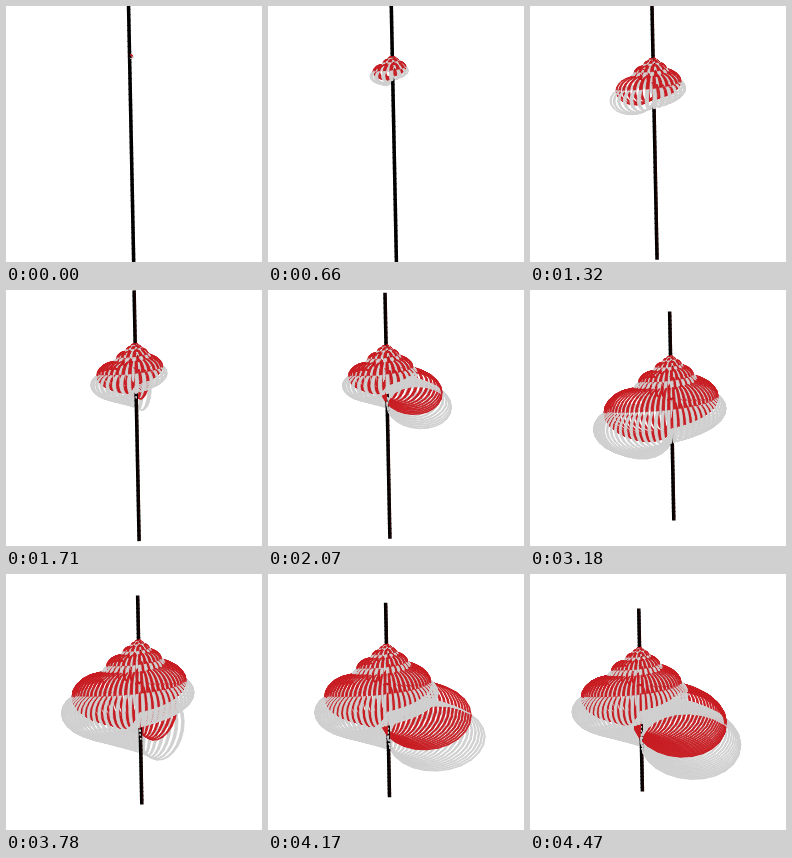
An HTML page with a canvas for the animation above (4500 ms loop, 256 by 256 pixels).

```html
<!DOCTYPE html>
<html lang="en">
<head>
<meta charset="utf-8">
<title>Growing shell</title>
<style>
  html, body { margin: 0; width: 100%; height: 100%; overflow: hidden; background: #fff; }
  canvas { display: block; width: 100vw; height: 100vh; }
</style>
</head>
<body>
<canvas id="stage" width="256" height="256"></canvas>
<script>
const ctx = document.getElementById('stage').getContext('2d');

const STEPS = 150, STEP_MS = 30;
const FIRST = 4, LAST = FIRST + STEPS - 1;
const TWIST = 8.55, END_ANGLE = 0.28;   // radians
const TILT = 0.14, LEAN = 0.02;
const RIBBON = 0.42, SEGMENTS = 24;

// Ring shape: distance from the axis, half width, drop below the tip, half height
const LAYERS = [
  { color: '#d0d0d0', dist: 0.279, wide: 0.281, drop: 0.540, high: 0.180 },
  { color: '#c81e23', dist: 0.220, wide: 0.262, drop: 0.420, high: 0.180 }
];

// Time in ms, value
const AXIS_X = [[0, 123.5], [600, 124.5], [1000, 123], [1320, 123], [1530, 131],
  [1820, 128], [2070, 118], [2400, 115], [2700, 118.5], [2760, 122], [3180, 140.5],
  [3400, 140], [3780, 132.5], [4320, 113], [4470, 109.5]];
const AXIS_LENGTH = [[0, 266], [1320, 255], [2070, 245], [2160, 244], [2700, 218],
  [3180, 208], [3780, 208], [4320, 188], [4470, 182]];

function valueAt(keys, t) {
  const i = keys.findIndex(k => k[0] >= t);
  if (i < 0) return keys[keys.length - 1][1];
  if (i === 0) return keys[0][1];
  const [t0, a] = keys[i - 1], [t1, b] = keys[i];
  return a + (b - a) * (t - t0) / (t1 - t0);
}

// Ring size grows evenly, its angle with the logarithm of the size
function pointOn(layer, n, v) {
  const s = n / LAST;
  const angle = END_ANGLE + TWIST * Math.log(s);
  const rho = s * (layer.dist + layer.wide * Math.cos(v));
  const down = s * (layer.drop - layer.high * Math.sin(v));
  const front = rho * Math.sin(angle);
  return {
    x: rho * Math.cos(angle) + LEAN * down,
    y: down + TILT * front,
    depth: front - TILT * down
  };
}

function buildParts() {
  const parts = [];
  const turn = 2 * Math.PI / SEGMENTS;
  for (const layer of LAYERS) {
    for (let n = FIRST; n <= LAST; n++) {
      for (let j = 0; j < SEGMENTS; j++) {
        const pts = [
          pointOn(layer, n - RIBBON, j * turn),
          pointOn(layer, n - RIBBON, (j + 1) * turn),
          pointOn(layer, n, (j + 1) * turn),
          pointOn(layer, n, j * turn)
        ];
        const depth = pts.reduce((sum, p) => sum + p.depth, 0) / 4;
        parts.push({ n, pts, depth, color: layer.color });
      }
    }
  }
  const pieces = 50;
  for (let i = 0; i < pieces; i++) {
    const y0 = -0.205 + i / pieces, y1 = y0 + 1 / pieces;
    parts.push({
      n: 0, axis: true, depth: -TILT * (y0 + y1) / 2,
      pts: [{ x: LEAN * y0, y: y0 }, { x: LEAN * y1, y: y1 }]
    });
  }
  return parts.sort((a, b) => a.depth - b.depth);
}

const parts = buildParts();

function line(x0, y0, x1, y1, color, width) {
  ctx.strokeStyle = color;
  ctx.lineWidth = width;
  ctx.beginPath();
  ctx.moveTo(x0, y0);
  ctx.lineTo(x1, y1);
  ctx.stroke();
}

function draw(step) {
  const t = step * STEP_MS;
  const size = valueAt(AXIS_LENGTH, t);
  const ox = valueAt(AXIS_X, t), oy = 127 - 0.3 * size;
  const px = p => ox + p.x * size, py = p => oy + p.y * size;

  ctx.fillStyle = '#fff';
  ctx.fillRect(0, 0, 256, 256);
  ctx.lineJoin = 'round';

  for (const part of parts) {
    if (part.n > FIRST + step) continue;
    const p = part.pts;
    if (part.axis) {
      const x0 = px(p[0]), y0 = py(p[0]), x1 = px(p[1]), y1 = py(p[1]);
      line(x0, y0 - 0.5, x1, y1 + 0.5, '#000', 3.5);
      if (t > 1000) line(x0 + 0.9, y0, x1 + 0.9, y1, '#3c0808', 0.7);
      continue;
    }
    ctx.fillStyle = ctx.strokeStyle = part.color;
    ctx.lineWidth = 0.9;
    ctx.beginPath();
    for (const q of p) ctx.lineTo(px(q), py(q));
    ctx.closePath();
    ctx.fill();
    ctx.stroke();
  }
}

const start = performance.now();
let shown = -1;

function tick() {
  const step = Math.floor((performance.now() - start) / STEP_MS) % STEPS;
  if (step !== shown) draw(shown = step);
  requestAnimationFrame(tick);
}

draw(shown = 0);
requestAnimationFrame(tick);
</script>
</body>
</html>
```
